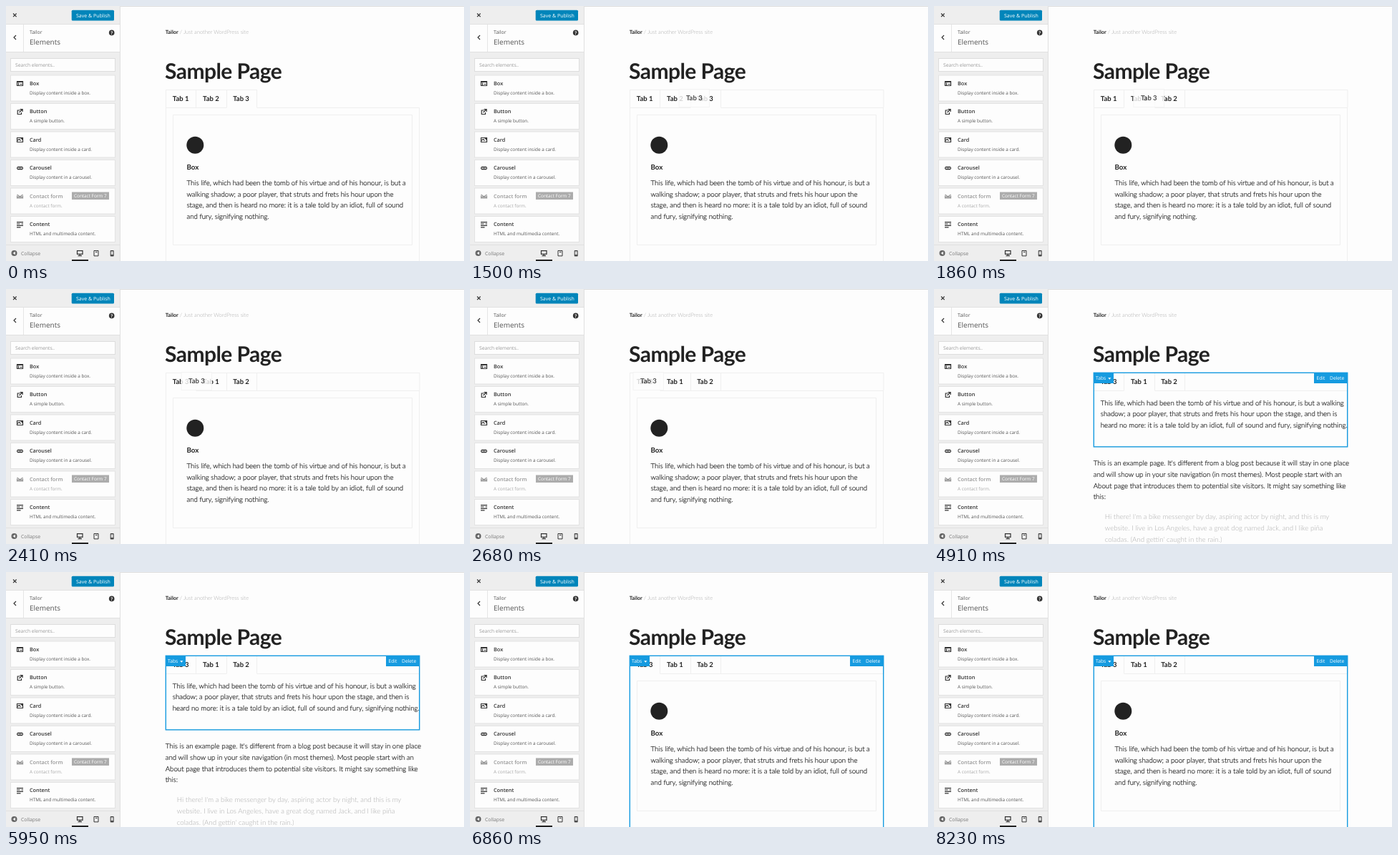
An HTML page that plays this animation: 640 by 357 pixels, repeating every 8.28 s.

```html
<!DOCTYPE html>
<html lang="en">
<head>
<meta charset="utf-8">
<title>Reordering tabs</title>
<style>
  html, body { margin: 0; width: 100%; height: 100%; overflow: hidden; background: #fdfdfd; }
  svg { display: block; width: 100vw; height: 100vh; }
  text { white-space: pre; text-rendering: geometricPrecision; }
  .ui { font-family: "Open Sans", sans-serif; font-size: 6.4px; fill: #555; }
  .ui .name { font-size: 7.3px; font-weight: 600; fill: #333; }
  .copy { font: 300 9.7px Lato, sans-serif; fill: #222; stroke: #222; stroke-width: .2px; }
  .quote { fill: #aaa; stroke: none; }
  .bold { font: 700 9.5px Lato, sans-serif; fill: #222; }
  .line { fill: none; stroke: #efefef; }
  .icon { fill: none; stroke: #333; stroke-width: 1.2; }
</style>
</head>
<body>
<svg viewBox="0 0 640 357">
  <rect width="640" height="357" fill="#fdfdfd"/>
  <path d="M160 .5H640" stroke="#ddd"/>

  <g class="ui">
    <rect width="159" height="357" fill="#eee"/>
    <path d="M159.5 0V357M0 25.5H159M0 64.5H159M0 334.5H159" stroke="#e0e0e0"/>
    <path class="icon" d="M10 10.5l4.6 4.6M14.6 10.5l-4.6 4.6"/>
    <rect x="91.7" y="5.7" width="59.3" height="14.8" rx="1.5" fill="#0085ba"/>
    <text x="98" y="15.6" font-size="7" style="fill:#fff">Save &amp; Publish</text>
    <rect y="26" width="159" height="38" fill="#fdfdfd"/>
    <path d="M24.5 26V64" stroke="#e5e5e5"/>
    <path class="icon" d="M14 41l-3 3 3 3"/>
    <text x="33" y="39.4" font-size="6.9">Tailor</text>
    <text x="33" y="54.2" font-size="10">Elements</text>
    <circle cx="147.7" cy="37.4" r="3.8" fill="#333"/>
    <text x="147.7" y="39.8" text-anchor="middle" font-weight="700" style="fill:#fff">?</text>
    <rect x="6.5" y="73.5" width="146" height="18" fill="#fdfdfd" stroke="#ddd"/>
    <text x="13" y="85" font-size="6.7" style="fill:#999">Search elements..</text>
    <g id="cards"></g>
    <rect x="92" y="260.5" width="52" height="10.5" fill="#acacac"/>
    <text x="95" y="268.1" style="fill:#fff">Contact Form 7</text>
    <circle cx="11.5" cy="346" r="4" fill="#666"/>
    <path d="M13 343.8v4.4l-3.6-2.2z" fill="#eee"/>
    <text x="21" y="348.5" font-size="6.85" style="fill:#777">Collapse</text>
    <path class="icon" d="M99.5 342.7h7.5v4.6h-7.5zM103.2 347v2.5M100.5 349.6h5.5"/>
    <rect x="92" y="355" width="23" height="2" fill="#222"/>
    <path class="icon" style="stroke-width:1" d="M123 342.5h6v7.4h-6zM125 344.5h2.5"/>
    <rect x="145.7" y="342" width="5" height="8.4" rx="1" fill="#444"/>
    <rect x="146.7" y="343.4" width="3" height="4.7" fill="#ddd"/>
  </g>

  <text class="bold" x="222.8" y="39.4" style="font-size:7.3px">Tailor</text>
  <text class="copy quote" x="242.8" y="39.4" style="font-size:7.6px">/ Just another WordPress site</text>
  <text class="bold" x="222" y="102" style="font-size:30px;letter-spacing:-.55px">Sample Page</text>

  <path class="line" id="tabLines"/>
  <path class="line" id="frameTop" d="M350 117.5H578V142"/>
  <g id="tabs">
    <text class="bold" y="133.2">Tab 1</text>
    <text class="bold" y="133.2">Tab 2</text>
    <text class="bold" y="133.2">Tab 3</text>
  </g>

  <g id="boxPanel">
    <path class="line" d="M223.5 142V357M577.5 142V357M233.5 152.5H567.5V334.5H233.5z"/>
    <circle cx="264.3" cy="194.8" r="12" fill="#222"/>
    <text class="bold" x="252.5" y="228.6" style="font-size:9.75px">Box</text>
  </g>
  <g id="textPanel">
    <path class="line" d="M223.5 142V221H578V142"/>
  </g>

  <g id="ghost" opacity=".82">
    <rect x="-10" y="116.5" width="42.5" height="25" fill="#fdfdfd" stroke="#f3f3f3"/>
    <text class="bold" y="132.4">Tab 3</text>
  </g>

  <g id="hover" class="ui">
    <rect id="outline" x="223.3" y="117.3" width="354.4" fill="none" stroke="#169be0" stroke-width="1.4"/>
    <path d="M223 117h28v15h-28zM531 117h47v15h-47z" fill="#169be0"/>
    <g font-size="6.7" style="fill:#fff">
      <text x="226" y="127.4">Tabs</text>
      <path d="M243.2 124.3h4.2l-2.1 2.4z"/>
      <text x="534.5" y="127.4">Edit</text>
      <text x="553" y="127.4">Delete</text>
    </g>
  </g>
</svg>
<script>
const LOOP = 8280;
const $ = id => document.getElementById(id);
const show = (id, visible) => { $(id).style.display = visible ? '' : 'none'; };

// Sidebar cards: name, description, icon path around (0, 0)
const cards = [
  ['Box', 'Display content inside a box.', 'M-4-3H4V3H-4zM-4-2H4M-2-1V3M0 1H3'],
  ['Button', 'A simple button.', 'M0-2H-3.3V3.5H2V1M0-3.3H3.6V0M3.4-3.2L-1 1'],
  ['Card', 'Display content inside a card.', 'M-4-3H4V3H-4zM-4 1L-1-1L1 1M1-2H3V0'],
  ['Carousel', 'Display content in a carousel.', 'M-3-1.6H3L4 0L3 1.6H-3L-4 0zM-2 0H2'],
  ['Contact form', 'A contact form.', 'M-4-2.6L0 .4L4-2.6M-4 2.4H4M-4 .8H4M-4-1V3M4-1V3'],
  ['Content', 'HTML and multimedia content.', 'M-4.5-3.4H4.5M-4.5-1H0M2-1H4.5M-4.5 1.4H4.5M-4.5 3.8H1']
];
$('cards').innerHTML = cards.map(([name, about, icon], i) => `
  <g transform="translate(0 ${96.5 + i * 39.5})">
    <rect x="6.5" y=".5" width="146" height="36" fill="#fdfdfd" stroke="#e3e3e3"/>
    <g opacity="${name === 'Contact form' ? .5 : 1}">
      <path class="icon" transform="translate(19.5 12)" d="${icon}"/>
      <text class="name" x="33" y="14.2">${name}</text>
      <text x="33" y="27.4">${about}</text>
    </g>
  </g>`).join('');

function addLines(id, x, y, lines, style = '') {
  $(id).insertAdjacentHTML('beforeend', lines.map((line, i) =>
    `<text class="copy ${style}" x="${x}" y="${y + i * 15.6}">${line}</text>`).join(''));
}
addLines('boxPanel', 252.5, 251.1, [
  'This life, which had been the tomb of his virtue and of his honour, is but a',
  'walking shadow; a poor player, that struts and frets his hour upon the',
  'stage, and then is heard no more: it is a tale told by an idiot, full of sound',
  'and fury, signifying nothing.'
]);
addLines('textPanel', 232.8, 162.7, [
  'This life, which had been the tomb of his virtue and of his honour, is but a walking',
  'shadow; a poor player, that struts and frets his hour upon the stage, and then is',
  'heard no more: it is a tale told by an idiot, full of sound and fury, signifying nothing.'
]);
addLines('textPanel', 222.8, 247.3, [
  "This is an example page. It's different from a blog post because it will stay in one place",
  'and will show up in your site navigation (in most themes). Most people start with an',
  'About page that introduces them to potential site visitors. It might say something like',
  'this:'
]);
addLines('textPanel', 238.8, 322.4, [
  "Hi there! I'm a bike messenger by day, aspiring actor by night, and this is my",
  'website. I live in Los Angeles, have a great dog named Jack, and I like piña',
  "coladas. (And gettin' caught in the rain.)"
], 'quote');

const slotX = slot => 232.8 + slot * 42.2;
const edgeX = slot => Math.round(223 + slot * 42.3) + .5;

// Pointer path of the dragged tab: [time, x]
const dragPath = [[1040, 317], [1500, 302], [1860, 289], [2300, 262], [2680, 238], [2900, 233]];
const DROP = 3000;

function dragX(t) {
  const next = dragPath.findIndex(([time]) => time > t);
  if (next < 0) return dragPath.at(-1)[1];
  const [t0, x0] = dragPath[next - 1], [t1, x1] = dragPath[next];
  return x0 + (x1 - x0) * (t - t0) / (t1 - t0);
}

function render(t) {
  const slots = t < 1680 ? [0, 1, 2] : t < 2300 ? [0, 2, 1] : [1, 2, 0];
  [...$('tabs').children].forEach((tab, i) => tab.setAttribute('x', slotX(slots[i])));

  const active = slots[t < 4900 || t >= 6050 ? 2 : t < 5500 ? 0 : 1];
  const edges = [0, 1, 2, 3].map(i => `M${edgeX(i)} 117V142`).join('');
  $('tabLines').setAttribute('d', `M223 117.5H350${edges}` +
    `M223 142.5H${edgeX(active)}M${edgeX(active + 1)} 142.5H578`);
  show('frameTop', t >= 50);

  const dragging = t >= dragPath[0][0] && t < DROP;
  show('ghost', dragging);
  if (dragging) $('ghost').setAttribute('transform', `translate(${dragX(t)} 0)`);

  const textOpen = t >= 4900 && t < 6050;
  show('textPanel', textOpen);
  show('boxPanel', !textOpen);
  show('hover', t >= 4900);
  $('outline').setAttribute('height', textOpen ? 103.6 : 260);
}

const start = performance.now();
(function frame() {
  render((performance.now() - start) % LOOP);
  requestAnimationFrame(frame);
})();
</script>
</body>
</html>
```
